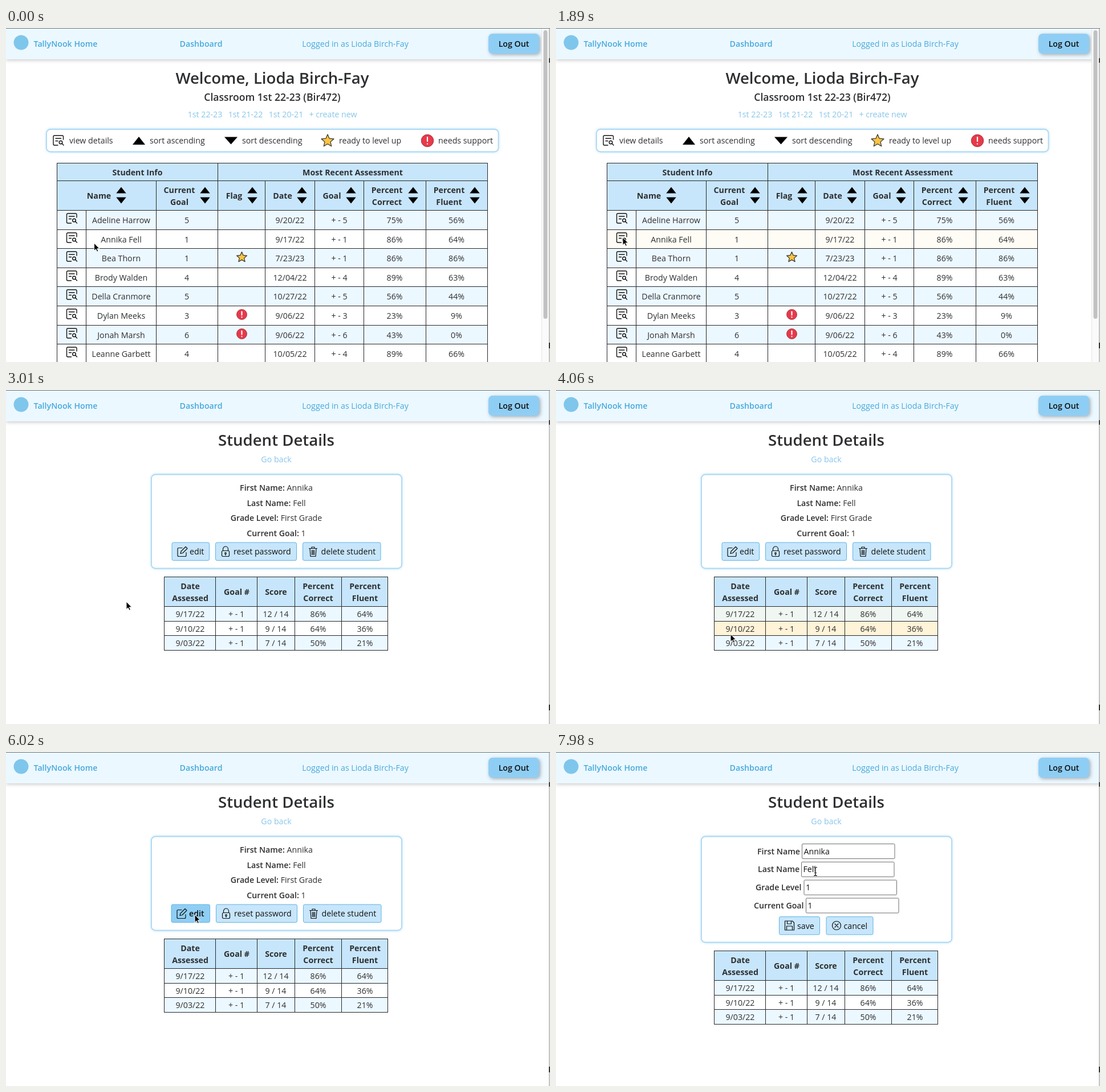
Write an HTML page that moves like this. It is 954 by 587 pixels and loops after 8000 ms.

```html
<!DOCTYPE html>
<html lang="en">
<head>
<meta charset="utf-8">
<title>Classroom dashboard</title>
<style>
html, body { margin: 0; width: 100%; height: 100%; overflow: hidden; background: #fff; }
svg { display: block; width: 954px; height: 587px; font: 14.2px "Open Sans", "Noto Sans", sans-serif; }
text { white-space: pre; }
</style>
</head>
<body>
<svg id="stage" viewBox="0 0 954 587" xmlns="http://www.w3.org/2000/svg"></svg>
<script>
const INK = '#2e2f31', HEAD = '#c7e6fb', PALE = '#ecf8ff', HOVER = '#ffe9b8';
const LINK = '#87c6e9', NAV = '#45a9dd', BLUE = '#8fcef4';
const LOOP = 8000, STEP = 70, FADE = 500;

// Text is placed by the vertical centre of its capitals.
const text = (x, y, str, { size = 14.2, weight = 400, fill = INK, anchor = 'middle' } = {}) =>
  `<text x="${x}" y="${y + size * 0.357}" font-size="${size}" font-weight="${weight}" fill="${fill}" text-anchor="${anchor}">${str}</text>`;
const left = (x, y, str, opts) => text(x, y, str, { anchor: 'start', ...opts });
const bold = (x, y, str) => text(x, y, str, { weight: 700 });
const rect = (x, y, x2, y2, fill, extra = '') =>
  `<rect x="${x}" y="${y}" width="${x2 - x}" height="${y2 - y}" fill="${fill}" ${extra}/>`;
const path = (d, extra = '') => `<path d="${d}" ${extra}/>`;
const group = (x, y, body, extra = '') => `<g transform="translate(${x} ${y})" ${extra}>${body}</g>`;
const line = width => `fill="none" stroke="#111" stroke-width="${width}" stroke-linecap="round" stroke-linejoin="round"`;

const triangle = (x, y, w, h) => path(`M${x - w} ${y + h / 2}h${2 * w}L${x} ${y - h / 2}z`);
const sorter = (x, y) => triangle(x, y - 10, 8.7, 11) + triangle(x, y + 8, 8.7, -11);
const detailsIcon = (x, y) => group(x - 10, y - 10,
  path('M18.5 8V3q0-2-2-2H3Q1 1 1 3v13q0 2 2 2h6M5 6h9.5M5 10.500h4') +
  '<circle cx="14" cy="13" r="2.800"/>' + path('M16 15l3 3'), line(1.4));

function starIcon(x, y, r) {
  const points = Array.from({ length: 10 }, (_, i) => {
    const a = i * Math.PI / 5, d = i % 2 ? r * 0.46 : r;
    return `${x + d * Math.sin(a)},${y - d * Math.cos(a)}`;
  });
  return `<polygon points="${points.join(' ')}" fill="#fbc343" stroke="#333" stroke-width="1.2" stroke-linejoin="round"/>`;
}
const alertIcon = (x, y, r) =>
  `<circle cx="${x}" cy="${y}" r="${r}" fill="#e8394a" stroke="#8f2a35" stroke-width=".8"/>` +
  path(`M${x} ${y - r * .55}v${r * .65}M${x} ${y + r * .52}v.1`, 'stroke="#fff" stroke-width="2.2" stroke-linecap="round"');

const panel = (x, y, x2, y2) =>
  rect(x, y, x2, y2, '#fff', 'rx="7" stroke="#acd9f4" stroke-width="1.800" filter="url(#glow)"');
const button = (x, x2, y, textX, label, icon, hot) =>
  rect(x, y, x2, y + 31.5, hot ? BLUE : HEAD, 'rx="2.5" stroke="#5fb4e5"') +
  group(x + 9, y + 6.5, icon, line(1.2)) +
  left(textX, y + 16, label, { fill: '#111', weight: hot ? 600 : 400 });

const icons = {
  edit: path('M9 3H3Q1 3 1 5v11q0 2 2 2h11q2 0 2-2v-5M6 13l1-4 8-8 3 3-8 8z'),
  lock: path('M4 8V5a4.5 4.5 0 0 1 9 0v3') + '<rect x="2" y="8" width="13" height="10" rx="2"/><circle cx="8.5" cy="12.5" r="1.3"/>' + path('M8.5 14v2'),
  trash: path('M2 4h14M6.5 4V1.5h5V4M3.5 4l1 14h9l1-14M7 7v8M9 7v8M11 7v8'),
  save: path('M1 1h13l3 3v13H1zM5 1v5h7V1M4 17v-7h10v7'),
  cancel: '<circle cx="9" cy="9" r="7.5"/>' + path('M6 6l6 6M12 6l-6 6')
};

const grid = (xs, ys) => path(
  ys.map(y => `M${xs[0]} ${y}H${xs.at(-1)}`).join('') +
  xs.map(x => `M${x} ${ys[0]}V${ys.at(-1)}`).join(''), 'stroke="#26282b" fill="none" stroke-linecap="square"');
const snap = v => Math.floor(v) + 0.5;

function header() {
  return rect(0, 0, 954, 55, PALE, 'filter="url(#drop)"') +
    '<circle cx="26.5" cy="25.5" r="13" fill="#7fc6ec"/>' +
    left(48.5, 28, 'TallyNook Home', { fill: NAV, weight: 600 }) +
    text(342, 28, 'Dashboard', { fill: NAV, weight: 600 }) +
    text(612.5, 28, 'Logged in as Lioda Birch-Fay', { fill: NAV }) +
    rect(846, 10, 935, 45, BLUE, 'rx="7" filter="url(#lift)"') +
    text(890.5, 28, 'Log Out', { fill: '#111', weight: 600 }) +
    rect(0, 0, 954, 1, '#68747b');
}

const students = [
  ['Adeline Harrow', 5, '', '9/20/22', '75%', '56%'],
  ['Annika Fell', 1, '', '9/17/22', '86%', '64%'],
  ['Bea Thorn', 1, 'star', '7/23/23', '86%', '86%'],
  ['Brody Walden', 4, '', '12/04/22', '89%', '63%'],
  ['Della Cranmore', 5, '', '10/27/22', '56%', '44%'],
  ['Dylan Meeks', 3, 'alert', '9/06/22', '23%', '9%'],
  ['Jonah Marsh', 6, 'alert', '9/06/22', '43%', '0%'],
  ['Leanne Garbett', 4, '', '10/05/22', '89%', '66%']
];

function dashboard() {
  const rowY = i => snap(320.5 + i * 33.6);
  let out = text(467, 88, 'Welcome, Lioda Birch-Fay', { size: 27.6, weight: 600 }) +
    text(467, 122, 'Classroom 1st 22-23 (Bir472)', { size: 17.6, weight: 600 });
  [[349, '1st 22-23'], [420, '1st 21-22'], [491, '1st 20-21'], [573.5, '+ create new']]
    .forEach(([x, str]) => out += text(x, 152, str, { fill: LINK }));

  out += panel(71, 178, 863.5, 217.5) + detailsIcon(92, 198) + triangle(233, 198, 11, 14) +
    triangle(394.5, 198, 11.5, -13) + starIcon(564, 198.5, 11.5) + alertIcon(739, 198, 10.8);
  [[111, 'view details'], [252, 'sort ascending'], [414, 'sort descending'], [584, 'ready to level up'], [758, 'needs support']]
    .forEach(([x, str]) => out += left(x, 198, str));

  out += rect(89.5, 237.5, 844.5, 320.5, HEAD) + bold(230.5, 253.5, 'Student Info') + bold(608, 253.5, 'Most Recent Assessment');
  [[163, 202, 'Name'], [304, 349, 'Current', 'Goal'], [400, 432, 'Flag'], [485, 519, 'Date'], [571.5, 605, 'Goal'],
   [668, 714, 'Percent', 'Correct'], [777, 822, 'Percent', 'Fluent']].forEach(([x, sortX, a, b]) => {
    out += (b ? bold(x, 284.5, a) + bold(x, 305.5, b) : bold(x, 295, a)) + sorter(sortX, 295);
  });

  students.forEach(([name, goal, flag, date, correct, fluent], i) => {
    const y = rowY(i), end = rowY(i + 1), mid = y + 17;
    out += rect(89.5, y, 844.5, end, i % 2 ? '#fff' : PALE);
    if (i === 1) out += rect(89.5, y, 844.5, end, HOVER, 'id="studentHover"');
    out += detailsIcon(115.5, mid - 2.5);
    if (flag) out += flag === 'star' ? starIcon(413.5, mid - 1.5, 9.5) : alertIcon(413.5, mid - 2, 9);
    [[202, name], [317, goal], [498, date], [584.5, `+ - ${goal}`], [681.5, correct], [790, fluent]]
      .forEach(([x, str]) => out += text(x, mid, str));
  });
  out += grid([89.5, 844.5], [237.5, 268.5, ...students.map((_, i) => rowY(i)), 590]) +
    grid([371.5], [237.5, 590]) + grid([263.5, 454.5, 541.5, 627.5, 736.5], [268.5, 590]) + grid([140.5], [320.5, 590]);
  return out + rect(939.5, 1, 952, 587, '#fafafa') + rect(939, 1, 940, 587, '#e6e6e6') +
    rect(942.5, 4, 949.5, 511, '#c1c1c1', 'rx="3.5"');
}

const rowTops = [0, 1, 2, 3].map(i => snap(380.5 + i * 25.7));
function assessments() {
  const rows = [['9/17/22', '12 / 14', '86%', '64%'], ['9/10/22', '9 / 14', '64%', '36%'], ['9/03/22', '7 / 14', '50%', '21%']];
  let out = rect(277.5, 328.5, 669.5, 380.5, HEAD) + bold(404.5, 355, 'Goal #') + bold(473.5, 355, 'Score');
  [[323, 'Date', 'Assessed'], [547.5, 'Percent', 'Correct'], [629.5, 'Percent', 'Fluent']]
    .forEach(([x, a, b]) => out += bold(x, 344.5, a) + bold(x, 365.5, b));
  rows.forEach(([date, score, correct, fluent], i) => {
    const y = rowTops[i], end = rowTops[i + 1];
    out += rect(277.5, y, 669.5, end, i % 2 ? '#fff' : PALE) + rect(277.5, y, 669.5, end, HOVER, 'class="rowHover"');
    [[323, date], [404, '+ - 1'], [473, score], [547.5, correct], [629.5, fluent]]
      .forEach(([x, str]) => out += text(x, y + 13, str));
  });
  return out + grid([277.5, 367.5, 440.5, 506.5, 588.5, 669.5], [328.5, ...rowTops]);
}

function viewCard() {
  const facts = [['First Name', 'Annika'], ['Last Name', 'Fell'], ['Grade Level', 'First Grade'], ['Current Goal', '1']];
  const actions = hot => {
    const d = hot ? 1 : 0;
    return button(291 - d, 356.5 + d, 268, 322 - d, 'edit', icons.edit, hot) +
      button(367.5 + d, 509.5 + d, 268, 399 + d, 'reset password', icons.lock) +
      button(520.5 + d, 657 + d, 268, 552.5 + d, 'delete student', icons.trash);
  };
  return panel(255, 148.5, 694, 313.5) +
    facts.map(([k, v], i) => text(474, 172 + i * 26.5, `<tspan font-weight="600">${k}:</tspan> ${v}`)).join('') +
    `<g id="idleActions">${actions(false)}</g><g id="hotActions">${actions(true)}</g>`;
}

function editCard() {
  const fields = [['First Name', 353, 431.5, 'Annika'], ['Last Name', 354, 430.5, 'Fell'], ['Grade Level', 350, 435, '1'], ['Current Goal', 347, 438.5, '1']];
  return panel(255, 148.5, 694, 334.5) + fields.map(([label, x, boxX, value], i) => {
    const y = 174.5 + i * 31.8;
    return left(x, y, label, { weight: 600 }) +
      rect(boxX, y - 13, boxX + 162.5, y + 13, '#fff', 'rx="1.5" stroke="#6f6f6f"') +
      left(boxX + 3, y, value, { fill: '#111' });
  }).join('') + button(391.5, 462.5, 289.5, 423, 'save', icons.save) + button(474, 556, 289.5, 504.5, 'cancel', icons.cancel);
}

const shadow = (id, dx, dy, blur, color, alpha) =>
  `<filter id="${id}" x="-20%" y="-40%" width="140%" height="180%" color-interpolation-filters="sRGB"><feDropShadow dx="${dx}" dy="${dy}" stdDeviation="${blur}" flood-color="${color}" flood-opacity="${alpha}"/></filter>`;

const stage = document.getElementById('stage');
stage.innerHTML = `<defs>${shadow('drop', 0, 2, 3, '#000', .2)}${shadow('lift', 2, 2, 3, '#000', .32)}${shadow('glow', 0, 0, 2, '#7fc6ef', .5)}</defs>
  ${header()}
  <g id="dashboard">${dashboard()}</g>
  <g id="details">
    ${text(474, 88, 'Student Details', { size: 27.6, weight: 600 })}${text(474, 122, 'Go back', { fill: LINK })}
    <g id="view">${viewCard()}</g><g id="form">${editCard()}</g><g id="scores">${assessments()}</g>
  </g>
  ${rect(952.4, 0, 953.4, 587, '#85898c')}${rect(952, 53, 954, 61, '#444')}${rect(952, 553, 954, 563, '#333')}
  <g id="pointer">
    ${path('M0 0V13.5L3.1 10.7L5.2 15.3L7.4 14.3L5.3 9.8H9.5Z', 'id="arrow" fill="#000" stroke="#fff" stroke-width="1"')}
    <g id="beam" fill="none">${['stroke="#fff" stroke-width="2.4" opacity=".7"', 'stroke="#111" stroke-width="1.2"']
      .map(s => path('M-3-7.5q3 0 3 2v11q0 2-3 2M3-7.5q-3 0-3 2v11q0 2 3 2M-2 2.5h4', s)).join('')}</g>
  </g>`;

const PAGE_AT = 1960, HOT_AT = 5810, FORM_AT = 6510;
const pointerPath = [
  [0, 154.5, 378], [70, 154.5, 378], [280, 135, 374], [560, 117, 368], [2660, 117, 368], [3010, 211, 372],
  [3410, 282, 380], [3785, 302, 406], [4060, 306, 429], [4340, 307, 444], [4760, 307, 445],
  [4970, 305, 411], [5250, 309, 380], [5740, 324, 306], [6020, 331, 286], [6800, 331, 286],
  [7140, 365, 260], [7420, 425, 224], [7630, 452, 212], [7980, 455, 210], [8000, 455, 210]
];
// Each entry: row, pointer enters, pointer leaves.
const hovers = [[0, 3410, 3785], [1, 3785, 4100], [2, 4100, 4970], [1, 4970, 5110], [0, 5110, 5250]];

function pointerAt(t) {
  const i = pointerPath.findIndex(p => p[0] > t);
  const [t0, x0, y0] = pointerPath[i - 1], [t1, x1, y1] = pointerPath[i];
  const k = (t - t0) / (t1 - t0);
  return [x0 + (x1 - x0) * k, y0 + (y1 - y0) * k];
}
function fade(t, enter, leave) {
  const peak = Math.min(1, Math.max(0, Math.min(t, leave) - enter) / FADE);
  return Math.max(0, peak - Math.max(0, t - leave) / FADE);
}

const el = id => document.getElementById(id);
const show = (id, on) => { el(id).style.display = on ? '' : 'none'; };
const rowHovers = document.querySelectorAll('.rowHover');

function render(time) {
  const t = Math.floor(time % LOOP / STEP) * STEP;
  const onDetails = t >= PAGE_AT, editing = t >= FORM_AT, hot = t >= HOT_AT;
  show('dashboard', !onDetails);
  show('details', onDetails);
  show('view', !editing);
  show('form', editing);
  show('idleActions', !hot);
  show('hotActions', hot);
  el('scores').setAttribute('transform', `translate(0 ${editing ? 21 : 0})`);
  el('studentHover').style.opacity = fade(t, 1820, PAGE_AT);
  rowHovers.forEach((row, i) => {
    row.style.opacity = Math.max(...hovers.filter(h => h[0] === i).map(h => fade(t, h[1], h[2])));
  });

  const [x, y] = pointerAt(t);
  const overDate = x > 297 && x < 349 && rowTops.slice(0, 3).some(top => Math.abs(y - top - 13) < 9);
  const overText = onDetails && (editing ? x > 431 : overDate);
  show('arrow', !overText);
  show('beam', overText);
  el('pointer').setAttribute('transform', `translate(${x} ${y})`);
}

const start = performance.now();
function tick() {
  render(performance.now() - start);
  requestAnimationFrame(tick);
}
tick();
</script>
</body>
</html>
```
